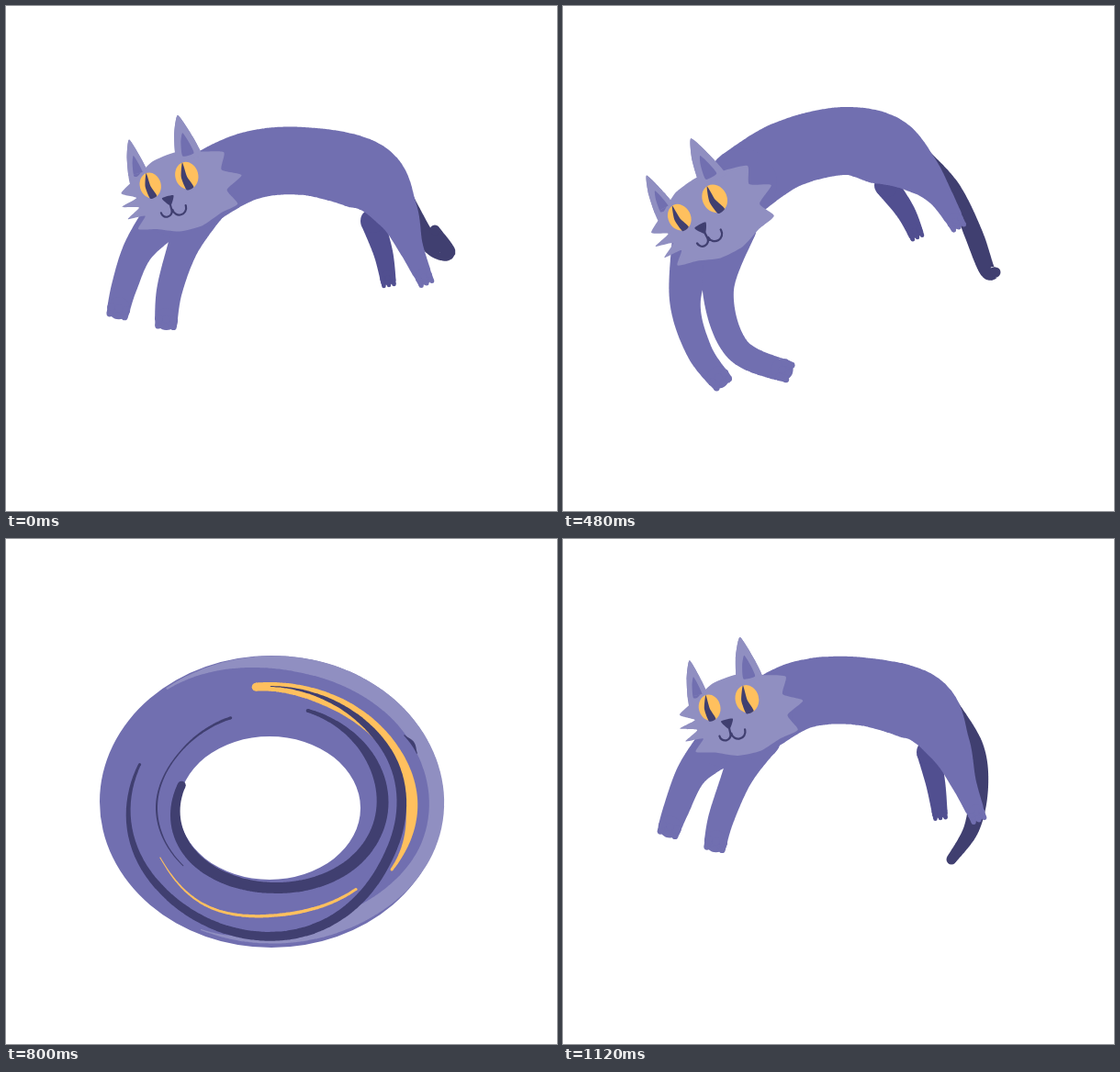
Animation, 600 px wide and 550 px high, one loop 1200 ms. Source, as an HTML page with a canvas:

```html
<!DOCTYPE html>
<html lang="en">
<head>
<meta charset="utf-8">
<title>Tumbling cat</title>
<style>
html, body { margin: 0; width: 100%; height: 100%; overflow: hidden; background: #fff; }
canvas { display: block; width: 600px; height: 550px; }
</style>
</head>
<body>
<canvas id="stage" width="600" height="550"></canvas>
<script>
const ctx = document.getElementById('stage').getContext('2d');
const STEP = 80, STEPS = 15, TAU = Math.PI * 2;
const FUR = '#716fb0', FACE = '#908fc1', DARK = '#403f70', SHADE = '#514f90', GOLD = '#ffc05e';

const rad = deg => deg * Math.PI / 180;
const lerp = (a, b, t) => a + (b - a) * t;
const points = text => text.split(' ').map(p => p.split(',').map(Number));
const pose = parts => Object.fromEntries(Object.entries(parts).map(([k, v]) => [k, points(v)]));

// Skeleton joints; head is "x,y tilt,size" and turn is "angle,size" of the whole cat.
const leap = pose({
  body: '205,205 262,175 325,169 393,186 425,224 441,263 458,302',
  near: '215,215 193,262 178,310 174,349', far: '178,224 145,264 129,305 121,337',
  hind: '399,234 411,270 417,304', tail: '427,176 443,222 462,259 481,268 467,244',
  head: '177,190 -15,1', turn: '0,1'
});
const dip = pose({
  body: '198,210 258,172 318,157 367,168 398,192 424,234 440,266',
  near: '200,235 185,277 179,325 183,375', far: '150,245 136,285 128,330 127,373',
  hind: '373,205 391,244 397,274', tail: '419,182 440,222 465,255 485,260 486,240',
  head: '162,209 -20,1.06', turn: '0,1'
});
const dive = pose({
  body: '195,193 243,162 305,147 352,158 388,182 411,207 431,241',
  near: '185,240 169,310 190,374 246,399', far: '145,250 133,320 148,375 174,411',
  hind: '352,195 373,224 386,252', tail: '398,160 425,198 447,248 462,288 471,290',
  head: '146,220 -28,1.06', turn: '0,1'
});
const rise = pose({
  body: '230,188 268,169 325,162 391,183 428,237 438,325 421,391',
  near: '225,212 195,250 180,280 172,303', far: '185,205 152,231 134,255 123,274',
  hind: '398,235 411,315 375,367', tail: '416,282 422,318 419,352 398,378 372,394',
  head: '202,166 1,1', turn: '0,1'
});
const glide = pose({
  body: '212,195 262,169 325,166 389,184 420,225 437,267 453,306',
  near: '212,215 190,258 172,305 165,337', far: '172,222 141,254 123,295 114,321',
  hind: '398,232 406,268 411,304', tail: '428,178 450,225 453,270 445,315 423,349',
  head: '180,179 -13,1.02', turn: '0,1'
});

const keys = [
  [0, leap], [4, dip], [6, dive], [7, { ...dive, turn: points('-10,.96') }],
  [11, { ...rise, turn: points('18,1') }], [12, rise], [14, glide]
];

const WIDTHS = {
  body: [76, 74, 74, 76, 48, 27, 18],
  leg: [52, 34, 28, 24],
  hind: [26, 21, 16],
  tail: [4, 15, 20, 17, 11]
};

// Smooth curve through rows of numbers, t from 0 to 1.
function spline(rows, t) {
  const last = rows.length - 1;
  const i = Math.min(last - 1, Math.floor(t * last)), f = t * last - i;
  const [a, b, c, d] = [-1, 0, 1, 2].map(k => rows[Math.max(0, Math.min(last, i + k))]);
  return b.map((v, j) => v + f / 2 * (c[j] - a[j] +
    f * (2 * a[j] - 5 * v + 4 * c[j] - d[j] + f * (3 * (v - c[j]) + d[j] - a[j]))));
}

const sample = (n, fn) => Array.from({ length: n + 1 }, (_, i) => fn(i / n));

function fill(color, rule) {
  ctx.fillStyle = color;
  ctx.fill(rule);
}

function oval(x, y, rx, ry, color) {
  ctx.beginPath();
  ctx.ellipse(x, y, rx, ry, 0, 0, TAU);
  fill(color);
}

// Closed shape through points; k sets how round the corners are.
function blob(pts, color, k = 0.1) {
  const at = i => pts[(i + pts.length) % pts.length];
  ctx.beginPath();
  ctx.moveTo(...pts[0]);
  pts.forEach((b, i) => {
    const a = at(i - 1), c = at(i + 1), d = at(i + 2);
    ctx.bezierCurveTo(b[0] + (c[0] - a[0]) * k, b[1] + (c[1] - a[1]) * k,
      c[0] - (d[0] - b[0]) * k, c[1] - (d[1] - b[1]) * k, ...c);
  });
  fill(color);
}

// Round-ended stroke along dense [x, y, width] points.
function brush(path, color) {
  const left = [], right = [];
  path.forEach(([x, y, w], i) => {
    const a = path[Math.max(0, i - 1)], b = path[Math.min(path.length - 1, i + 1)];
    const dx = b[0] - a[0], dy = b[1] - a[1], s = w / 2 / (Math.hypot(dx, dy) || 1);
    left.push([x - dy * s, y + dx * s]);
    right.unshift([x + dy * s, y - dx * s]);
  });
  blob([...left, ...right], color, 0);
  for (const [x, y, w] of [path[0], path.at(-1)]) oval(x, y, w / 2, w / 2, color);
}

function limb(joints, widths, color, toes = true) {
  const rows = joints.map((p, i) => [...p, widths[i]]);
  const path = sample(60, t => spline(rows, t));
  if (!toes) return brush(path, color);
  const [x, y, w] = path.pop(), [px, py] = path.at(-1);
  const a = Math.atan2(y - py, x - px);
  blob([...path.map(p => p)].slice(-1), color, 0);
  brush([...path.slice(0, -3), [x - 8 * Math.cos(a), y - 8 * Math.sin(a), w]], color);
  for (const side of [-1, 0, 1]) {
    const sx = -Math.sin(a) * side * w * 0.35, sy = Math.cos(a) * side * w * 0.35;
    brush([[x + sx - 8 * Math.cos(a), y + sy - 8 * Math.sin(a), w * 0.34], [x + sx, y + sy, w * 0.28]], color);
  }
}

// Part of the face edge, with tufts when shaggy.
const rim = (from, to, n, shaggy) => sample(n - 1, t => {
  const tip = Math.round(t * (n - 1)) % 2 ? -0.12 : 0.18;
  const a = rad(lerp(from, to, t)), r = 1 + (shaggy ? tip : 0);
  return [11 + 57 * r * Math.cos(a), 15 + 43 * r * Math.sin(a)];
});

function ear(x, y, w, h) {
  const shape = (s, dy) => [[x - w * s, y + dy], [x - w * s * 0.7, y + dy - h * s * 0.6],
    [x, y + dy - h * s], [x + w * s * 0.7, y + dy - h * s * 0.5], [x + w * s, y + dy]];
  blob(shape(1, 0), FACE);
  blob(shape(0.45, -h * 0.18), FUR);
}

function eye(x, rx, ry) {
  oval(x, 0, rx, ry, GOLD);
  blob([[x - 1, -ry], [x - rx / 2, 0], [x - rx / 3, ry], [x + rx / 3, ry * 0.92], [x, 1]], DARK);
}

function head([[x, y], [tilt, size]]) {
  ctx.save();
  ctx.translate(x, y);
  ctx.rotate(rad(tilt));
  ctx.scale(size, size);
  ear(-30, -5, 11, 49);
  ear(28, -12, 14, 54);
  blob([...rim(-35, 35, 5, true), ...rim(52, 130, 4), ...rim(147, 197, 7, true), ...rim(218, 302, 4)], FACE);
  ctx.save();
  ctx.beginPath();
  ctx.rect(-90, -90, 180, 74);
  ctx.clip();
  ear(-30, -5, 11, 49);
  ear(28, -12, 14, 54);
  ctx.restore();
  eye(-20.5, 11.5, 14);
  eye(20.5, 12.5, 15);
  blob([[-12, 17], [1, 17], [-5, 27]], DARK);
  ctx.beginPath();
  ctx.moveTo(-5, 25);
  ctx.lineTo(-5, 32);
  ctx.arc(-11, 32, 6, 0, Math.PI);
  ctx.moveTo(11, 31);
  ctx.arc(3.5, 32, 7.5, 0, Math.PI);
  ctx.strokeStyle = DARK;
  ctx.lineWidth = 2.2;
  ctx.lineCap = ctx.lineJoin = 'round';
  ctx.stroke();
  ctx.restore();
}

function cat(p) {
  const [angle, size] = p.turn[0];
  ctx.save();
  ctx.translate(290, 287);
  ctx.rotate(rad(angle));
  ctx.scale(size, size);
  ctx.translate(-290, -287);
  limb(p.tail, WIDTHS.tail, DARK, false);
  limb(p.hind, WIDTHS.hind, SHADE);
  limb(p.far, WIDTHS.leg, FUR);
  limb(p.near, WIDTHS.leg, FUR);
  limb(p.body, WIDTHS.body, FUR);
  head(p.head);
  ctx.restore();
}

// A ring lies between two ellipses; radius 0 is the hole's edge, 1 the outer edge.
function sweeper(hole, rim, spin = 0) {
  const on = ([x, y, rx, ry], a) => [x + rx * Math.cos(a), y + ry * Math.sin(a)];
  return (color, from, to, radii, widths) => brush(sample(90, t => {
    const a = rad(lerp(from, to, t) + spin);
    const [r] = spline(radii.map(v => [v]), t), [w] = spline(widths.map(v => [v]), t);
    const [ax, ay] = on(hole, a), [bx, by] = on(rim, a);
    return [lerp(ax, bx, r), lerp(ay, by, r), Math.max(w, 1)];
  }), color);
}

function openRing() {
  const sweep = sweeper([281, 281, 117, 100], [287, 279, 190, 154]);
  sweep(SHADE, 180, 244, [0.97, 0.92, 0.9, 0.88], [3, 12, 16, 15]);
  sweep(FACE, -66, -10, [0.98, 0.8, 0.55, 0.4], [8, 24, 24, 8]);
  sweep(FACE, -69, -8, [0.45, 0.44, 0.4], [6, 22, 6]);
  sweep(FUR, 266, 0, [0.18, 0.32, 0.5, 0.5, 0.5, 0.5, 0.5], [20, 42, 66, 62, 52, 64, 76]);
  sweep(FUR, 2, -47, [0.72, 0.76, 0.84], [44, 42, 30]);
  sweep(FUR, 2, -57, [0.15, 0.12, 0.08], [26, 22, 15]);
  sweep(GOLD, -28, 210, [0.55, 0.43, 0.5, 0.62, 0.72, 0.78, 0.76, 0.75], [8, 19, 10, 7, 7, 5, 3.5, 1.5]);
  sweep(DARK, -52, 158, [0.65, 0.4, 0.24, 0.27, 0.53, 0.72, 0.68], [7, 10, 10, 9, 7, 5, 2]);
  sweep(DARK, 291, 180, [1, 0.8, 0.62, 0.58, 0.7, 0.97], [14, 20, 18, 11, 6, 2]);
}

function fullRing(spin) {
  const hole = [287, 293, 99, 78], rim = [289, 286, 187, 159];
  const sweep = sweeper(hole, rim, spin);
  ctx.beginPath();
  for (const e of [rim, hole]) {
    ctx.moveTo(e[0] + e[2], e[1]);
    ctx.ellipse(...e, 0, 0, TAU);
  }
  fill(FUR, 'evenodd');
  sweep(FACE, 232, 475, [0.97, 0.91, 0.91, 0.92, 0.84, 0.93], [2, 16, 17, 16, 17, 1]);
  sweep(GOLD, -96, 33, [0.62, 0.58, 0.58, 0.62, 0.66], [9, 15, 15, 13, 3]);
  sweep(GOLD, 150, 50, [0.45, 0.58, 0.52, 0.52], [1, 2.5, 3.5, 3]);
  sweep(DARK, 198, -72, [0.02, 0.09, 0.12, 0.22, 0.29, 0.38], [9, 13, 12, 13, 12, 4]);
  sweep(DARK, 200, -90, [0.6, 0.72, 0.83, 0.52, 0.53, 0.62], [3, 8, 10, 11, 9, 1]);
  sweep(DARK, 250, 140, [0.3, 0.26, 0.28, 0.28], [3, 1.5, 2, 1]);
  sweep(DARK, -31, -22, [0.8, 0.83, 0.82], [1, 4, 1]);
}

function poseAt(step) {
  const next = Math.max(1, keys.findIndex(([at]) => at >= step));
  const [from, a] = keys[next - 1], [to, b] = keys[next];
  const t = (step - from) / (to - from), out = {};
  for (const part in a)
    out[part] = a[part].map((p, i) => p.map((v, j) => lerp(v, b[part][i][j], t)));
  return out;
}

function draw(step) {
  ctx.fillStyle = '#fff';
  ctx.fillRect(0, 0, 600, 550);
  if (step === 8) openRing();
  else if (step === 9) fullRing(30);
  else if (step === 10) fullRing(0);
  else cat(poseAt(step));
}

const start = performance.now();
function tick() {
  draw(Math.floor((performance.now() - start) / STEP) % STEPS);
  requestAnimationFrame(tick);
}
tick();
</script>
</body>
</html>
```
